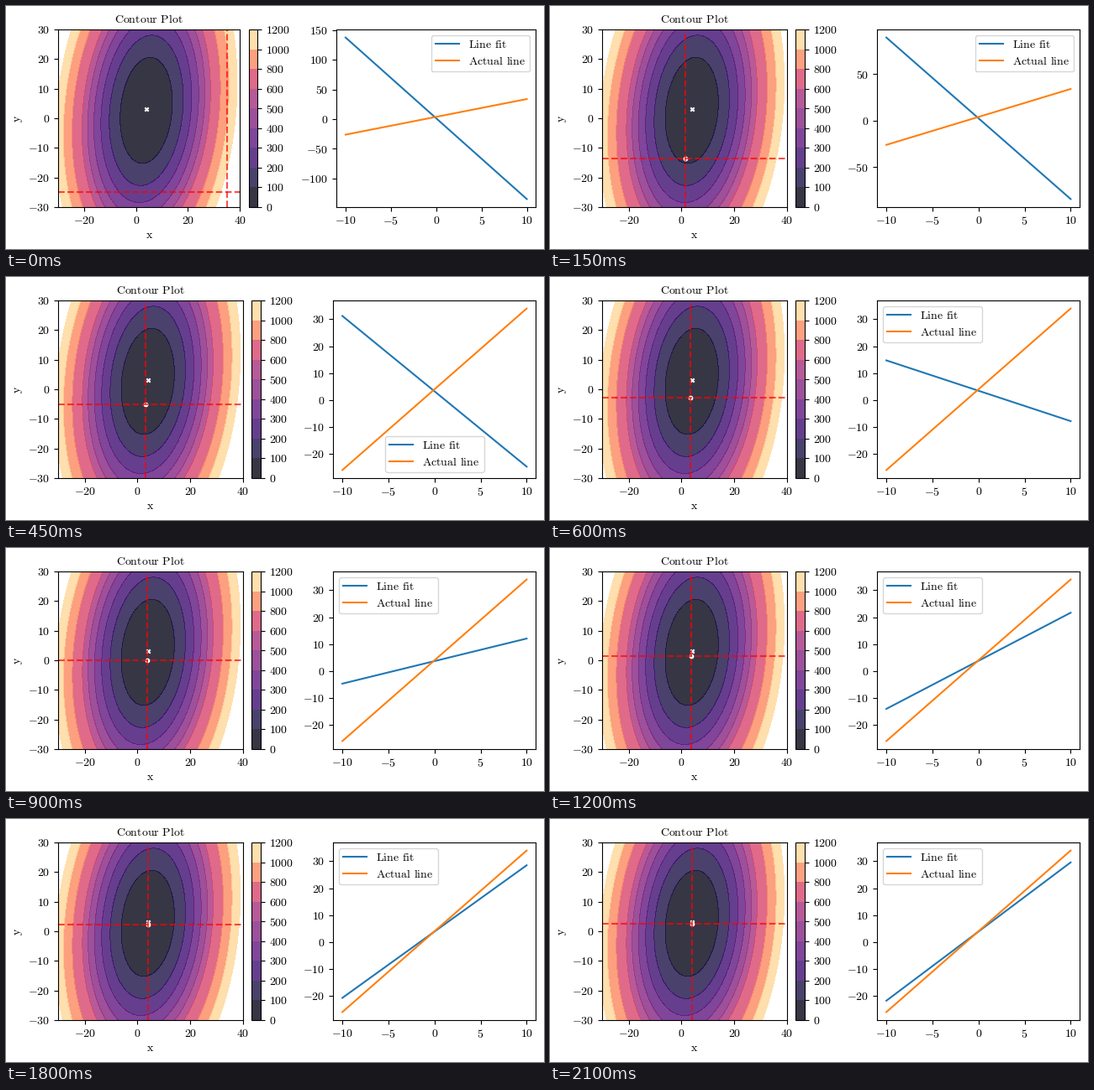
These frames come from a looping animation (640x290 px, 2.25 s). A matplotlib script:

```python
import numpy as np
import matplotlib.pyplot as plt
from matplotlib.animation import FuncAnimation
from matplotlib.ticker import FuncFormatter

WIDTH, HEIGHT, DPI = 640, 290, 100
FRAMES, INTERVAL = 15, 150

# Moments of the regression data and its least squares solution
MEAN_X, MEAN_X2, NOISE = -0.085, 0.316, 1.0
BEST = np.array([3.92, 2.668])
HESSIAN = np.array([[1, MEAN_X], [MEAN_X, MEAN_X2]])
RATE = 0.5

plt.rcParams.update({
    "font.family": "Liberation Serif",
    "font.size": 10,
    "mathtext.fontset": "cm",
    "axes.titlesize": 10,
    "axes.labelpad": 3.4,
    "legend.fontsize": 10,
    "legend.labelspacing": 0.43,
    "legend.borderpad": 0.38,
})


def roman(text):
    """Set text upright in Computer Modern."""
    return r"$\mathrm{" + text.replace(" ", r"\hspace{0.38}") + "}$"


def descend(start, steps):
    path = [np.array(start, float)]
    for _ in range(steps):
        path.append(path[-1] - 2 * RATE * HESSIAN @ (path[-1] - BEST))
    return path


def loss(intercept, slope):
    u, v = intercept - BEST[0], slope - BEST[1]
    return u**2 + 2 * MEAN_X * u * v + MEAN_X2 * v**2 + NOISE


def place(ax, left, right, top=28, bottom=240):
    """Position axes by pixel edges measured from the top left."""
    ax.set_position([left / WIDTH, 1 - bottom / HEIGHT,
                     (right - left) / WIDTH, (bottom - top) / HEIGHT])


path = descend((35, -25), FRAMES)
numbers = FuncFormatter(lambda value, _: f"${round(value)}$")

fig = plt.figure(figsize=(WIDTH / DPI, HEIGHT / DPI), dpi=DPI)
contour_ax, bar_ax, line_ax = (fig.add_axes([0.1 + 0.3 * i, 0.2, 0.2, 0.7])
                               for i in range(3))

# Loss surface
levels = [*range(0, 601, 100), 800, 1000, 1200]
grid = np.meshgrid(np.linspace(-30, 40, 200), np.linspace(-30, 30, 200))
surface = contour_ax.contourf(*grid, loss(*grid), levels=levels,
                              cmap="magma", alpha=0.8)
fig.colorbar(surface, cax=bar_ax, ticks=levels, format=numbers)
contour_ax.scatter(4, 3, s=10, c="white", marker="x")
dot = contour_ax.scatter(*path[0], s=10, c="white")
cross = dict(color="red", linestyle="--", alpha=0.7)
v_line = contour_ax.axvline(path[0][0], **cross)
h_line = contour_ax.axhline(path[0][1], **cross)
contour_ax.set(xlim=(-30, 40), ylim=(-30, 30), title=roman("Contour Plot"),
               xlabel=roman("x"), ylabel=roman("y"))

# Fitted and true lines
x = np.linspace(-10, 10, 100)
fit, = line_ax.plot(x, x, label=roman("Line fit"))
line_ax.plot(x, 4 + 3 * x, label=roman("Actual line"))
line_ax.legend(loc="best")

for axis in (contour_ax.xaxis, contour_ax.yaxis, line_ax.xaxis, line_ax.yaxis):
    axis.set_major_formatter(numbers)


def update(step):
    intercept, slope = path[step]
    dot.set_offsets([path[step]])
    v_line.set_xdata([intercept] * 2)
    h_line.set_ydata([slope] * 2)

    # The line panel already shows the parameters after the update
    next_intercept, next_slope = path[step + 1]
    fit.set_ydata(next_intercept + next_slope * x)
    line_ax.relim()
    line_ax.autoscale_view()

    # Wider tick labels in the first step squeeze the panels
    edge, line_left = (278.2, 393.2) if step == 0 else (282, 389.2)
    place(contour_ax, 62.15, edge)
    place(bar_ax, edge + 10.4, edge + 21)
    place(line_ax, line_left, 630.3)
    return dot, v_line, h_line, fit


anim = FuncAnimation(fig, update, frames=FRAMES, interval=INTERVAL,
                     repeat=True, repeat_delay=0, blit=False)
plt.show()
```
